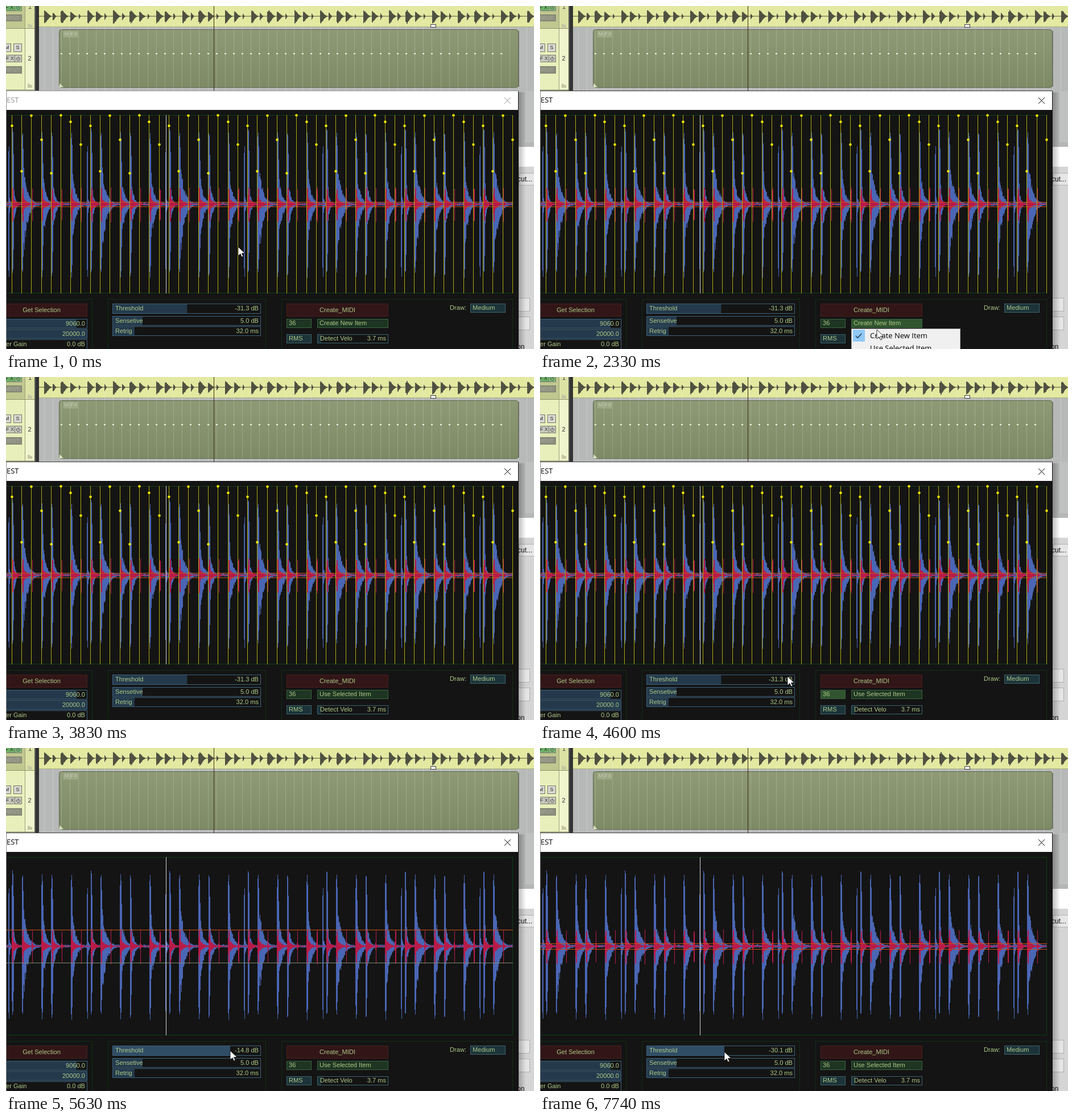
Write an HTML page with a canvas that moves like this. It is 928 px wide and 604 px high and loops after 8 s.

```html
<!DOCTYPE html>
<html>
<head>
<meta charset="utf-8">
<style>
html, body { margin: 0; width: 100%; height: 100%; overflow: hidden; background: #141414; }
canvas { display: block; }
</style>
</head>
<body>
<canvas id="stage" width="928" height="604"></canvas>
<script>
const ctx = document.getElementById('stage').getContext('2d');
const LOOP = 8000;
const UI = '11.1px "Liberation Sans", Arial, sans-serif';
const SYSTEM = '13px "Open Sans", sans-serif';
const TEXT = '#aeca88';

// Pointer positions: [start time, x, y]
const POINTER = [
  [0, 408, 424], [280, 470, 468], [530, 558, 530], [790, 608, 559], [1060, 599, 560],
  [1330, 590, 562], [2080, 592, 570], [2580, 604, 577], [2830, 612, 592], [3080, 620, 620],
  [4100, 585, 592], [4350, 500, 554], [4600, 435, 527], [4850, 394, 533],
  [6460, 420, 545], [6710, 372, 584], [6960, 326, 554], [7210, 325, 545], [7460, 324, 535]
];
const HOVER_DELAY = 250;
// Threshold in dB: [start time, value]
const THRESHOLD = [[0, -31.3], [5380, -14.8], [7740, -30.1]];

const HIT_STEP = 17.255, NOTE_STEP = 15.15, NOTES = 52, MID = 349;
const DOT_Y = [211, 291, 193, 235.5, 294.5, 192.5, 204, 244];
// Drum hits in one bar: offset, peak up, peak down, body, decay, peak width
const HITS = [
  [0, 135, 122, 24, 3, 4], [17.3, 127, 121, 62, 7, 4], [51.8, 127, 129, 42, 6, 4],
  [69, 127, 128, 32, 4.5, 4], [103.5, 126, 130, 46, 6, 4], [131.6, 102, 128, 14, 2, 2]
];
// Overview blobs, one per step: height, decay
const BLOBS = [[12, 7], [9, 7], [5, 2.5], [12, 7.5], [10, 7], [6, 2.5], [12, 7.5], [7, 4]];

const mod = (a, n) => ((a % n) + n) % n;
const noise = n => mod(Math.sin(n * 127.1) * 43758.5, 1);
const valueAt = (list, t) => list.filter((p, i) => !i || p[0] <= t).pop().slice(1);

function rect(x, y, w, h, fill, stroke) {
  if (fill) { ctx.fillStyle = fill; ctx.fillRect(x, y, w, h); }
  if (stroke) {
    ctx.strokeStyle = stroke;
    ctx.lineWidth = 1;
    ctx.strokeRect(x + .5, y + .5, w - 1, h - 1);
  }
}
function text(str, x, y, color = TEXT, font = UI, align = 'left') {
  ctx.font = font;
  ctx.fillStyle = color;
  ctx.textAlign = align;
  ctx.textBaseline = 'middle';
  ctx.fillText(str, x, y);
}
function vertical(y0, y1, top, bottom) {
  const g = ctx.createLinearGradient(0, y0, 0, y1);
  g.addColorStop(0, top);
  g.addColorStop(1, bottom);
  return g;
}

function column(path, x, mid, up, down) {
  path.rect(x, mid - up, 1, up + down);
}
function buildWaves() {
  const blue = new Path2D(), red = new Path2D(), overview = new Path2D();
  const bar = HIT_STEP * 8;
  for (let x = 1; x < 891; x++) {
    let up = 1 + 2 * noise(x), down = 1 + 2 * noise(x + 9);
    for (const [offset, top, bottom, body, decay, width] of HITS) {
      const d = mod(x - 10 - offset, bar);
      const fade = Math.exp(-Math.max(0, d - width) / decay);
      const peak = d < width ? 1 - .12 * (d - 1.3) ** 2 : 0;
      up = Math.max(up, top * peak, body * fade * (.7 + .4 * noise(x * 3)));
      down = Math.max(down, bottom * peak, 1.3 * body * fade * (.7 + .4 * noise(x * 5)));
    }
    column(blue, x, MID, up, down);

    const step = mod(Math.floor((x - 10) / HIT_STEP), 8);
    const d = mod(x - 10, HIT_STEP);
    const soft = step === 2 || step === 5 || step === 7;
    const spike = d >= 1 && d < (soft ? 2.2 : 3) ? 25 + 5 * noise(x) : 0;
    const body = (soft ? 8 : 19) * Math.exp(-d / (soft ? 3 : 6)) * (.75 + .3 * noise(x * 7));
    column(red, x, MID, Math.max(.8, spike, body), Math.max(.8, spike * 1.08, body));
  }
  for (let x = 58; x < 928; x++) {
    const d = mod(x - 97, NOTE_STEP);
    const [height, decay] = BLOBS[mod(Math.floor((x - 97) / NOTE_STEP), 8)];
    let h = height * Math.exp(-((d / decay) ** 2)) * (.85 + .2 * noise(x));
    if (mod(x - 97, NOTE_STEP * 8) > 119.5) h = 9;
    column(overview, x, 18, Math.max(.6, h * .9), Math.max(.6, h * 1.1));
  }
  return { blue, red, overview };
}
const waves = buildWaves();

function smallButton(x, y, w, h, label, fill, color) {
  rect(x, y, w, h, fill, '#77796a');
  text(label, x + w / 2, y + h / 2 + .5, color, '9px "Liberation Sans", sans-serif', 'center');
}
function powerIcon(x, y) {
  ctx.strokeStyle = '#444';
  ctx.lineWidth = 1;
  ctx.beginPath();
  ctx.arc(x, y, 3, -1, 4.1);
  ctx.moveTo(x, y - 4);
  ctx.lineTo(x, y);
  ctx.stroke();
}

function drawTrackPanel() {
  rect(0, 0, 50, 150, '#f1f5cd');
  rect(0, 0, 33, 40, '#c0c78f');
  rect(0, 40, 33, 110, '#e8efbb');
  rect(33, 0, 17, 40, '#dce2a5');
  rect(33, 0, 1, 150, '#9aa076');
  rect(0, 39, 50, 1, '#8b9069');
  rect(0, 147, 50, 2, '#a3a884');
  rect(50, 0, 8, 150, '#333');
  rect(50, 0, 2, 150, '#62645a');
  smallButton(-4, -4, 20, 13, 'F X', '#6fae6a', '#173d17');
  smallButton(15, -4, 13, 13, '', '#7ebd78');
  powerIcon(21.5, 3);
  smallButton(-8, 15, 36, 12, 'INPUT', '#8f927f', '#a8aa98');
  smallButton(-6, 66, 15, 15, 'M', '#d9d9d3', '#222');
  smallButton(13, 66, 15, 15, 'S', '#d9d9d3', '#222');
  smallButton(-2, 86, 18, 13, 'F X', '#c9cabf', '#333');
  smallButton(15, 86, 13, 13, '', '#c9cabf');
  powerIcon(21.5, 93);
  smallButton(-8, 106, 36, 13, 'INPUT', '#8d9080', '#a5a796');
  text('1', 42, 2, '#444', UI, 'center');
  text('2', 41.5, 93, '#333', UI, 'center');
  for (const y of [31, 137]) {
    rect(38, y, 4, 2, '#c5c8a3');
    rect(38, y + 2, 8, 5, '#c5c8a3');
  }
}

function drawArrange(showNotes) {
  rect(58, 0, 870, 150, '#b7b9b8');
  rect(58, 0, 870, 37, '#e3e9a0');
  rect(58, 36, 870, 1, '#aeb47a');
  for (let k = -2; k < 56; k++) {
    rect(Math.round(97 + k * NOTE_STEP), 0, 1, 150, 'rgba(235,238,225,.3)');
  }
  ctx.fillStyle = '#505141';
  ctx.fill(waves.overview);

  ctx.beginPath();
  ctx.roundRect(93.5, 41.5, 807, 102, 4);
  ctx.fillStyle = vertical(41, 143, '#8e9a75', '#7d8a65');
  ctx.fill();
  ctx.strokeStyle = '#5d674c';
  ctx.lineWidth = 1;
  ctx.stroke();
  rect(900, 44, 1.5, 98, '#3b4230');
  for (let k = 0; k < 54; k++) {
    rect(Math.round(97 + k * NOTE_STEP), 42, 1, 101, 'rgba(225,230,210,.25)');
  }
  ctx.fillStyle = '#dce3c0';
  ctx.beginPath();
  ctx.moveTo(94, 136);
  ctx.lineTo(101, 143);
  ctx.lineTo(94, 143);
  ctx.fill();
  rect(101, 44, 11, 11, '#98a381', '#a9b392');
  rect(113, 44, 13, 11, '#98a381', '#a9b392');
  text('M', 106.5, 50, '#ccd4b7', '9px "Liberation Sans", sans-serif', 'center');
  text('FX', 119.5, 50, '#ccd4b7', '9px "Liberation Sans", sans-serif', 'center');
  if (showNotes) {
    for (let k = 0; k < NOTES; k++) rect(Math.round(96 + k * NOTE_STEP), 83, 3, 2, '#f4f6ea');
  }
  rect(365, 0, 1, 150, '#3a2c18');
  rect(746, 32, 10, 6, '#f5f5f5', '#444');
}

function drawRightSide() {
  rect(901, 150, 27, 98, '#b5b7b6');
  rect(912, 150, 16, 90, '#bfc1c0');
  rect(901, 248, 27, 35, '#fff');
  rect(901, 283, 27, 321, '#d5d5d5');
  rect(901, 294, 30, 22, '#e6e6e6', '#b2b2b2');
  text('cut...', 899, 306, '#111', '12px "Liberation Sans", sans-serif');
  rect(890, 514, 31, 24, '#e5e5e5', '#b0b0b0');
  rect(890, 547, 31, 24, '#e5e5e5', '#b0b0b0');
  text('on', 898, 601, '#111', '12px "Liberation Sans", sans-serif');
  const shadow = ctx.createLinearGradient(901, 0, 914, 0);
  shadow.addColorStop(0, 'rgba(0,0,0,.25)');
  shadow.addColorStop(1, 'rgba(0,0,0,0)');
  rect(901, 152, 13, 452, shadow);
}

function drawWindow(active) {
  rect(0, 149, 901, 455, '#141414');
  rect(0, 149, 901, 1, active ? '#3c3c3c' : '#9b9b9b');
  rect(0, 150, 900, 33, '#fff');
  const ink = active ? '#000' : '#929292';
  text('EST', 1, 167, ink, SYSTEM);
  ctx.strokeStyle = ink;
  ctx.lineWidth = 1;
  ctx.beginPath();
  ctx.moveTo(876, 161); ctx.lineTo(887, 172);
  ctx.moveTo(887, 161); ctx.lineTo(876, 172);
  ctx.stroke();
}

function drawWave(db, showMarkers) {
  rect(-2, 192, 893, 314, null, '#103d14');
  ctx.fillStyle = '#4a66b4';
  ctx.fill(waves.blue);
  ctx.fillStyle = '#b81b48';
  ctx.fill(waves.red);
  const level = 157 * 10 ** (db / 20);
  rect(1, Math.round(MID - level), 890, 1, '#cc5014');
  rect(1, Math.round(MID + level), 890, 1, level > 20 ? '#7b8d70' : '#cc5014');
  if (showMarkers) {
    for (let k = 0; k < NOTES; k++) {
      const x = Math.round(9.9 + k * HIT_STEP);
      rect(x, 192, 1, 314, '#a9a90e');
      ctx.fillStyle = '#f2ee00';
      ctx.beginPath();
      ctx.arc(x + .5, DOT_Y[k % 8], 2.3, 0, 7);
      ctx.fill();
    }
  }
  rect(281, 192, 1, 314, '#d4d4d4');
}

const PALETTE = {
  red: ['#321617', '#4c2021', '#4a1c1e'],
  green: ['#1d3522', '#30552f', '#3d6340'],
  teal: ['#1c3339', '#28484f', '#3d636a'],
  blue: ['#243a4c', '#304d66', '#3e617a']
};
function drawControls(px, py, db, mode, menuOpen) {
  const over = (x, y, w, h) => !menuOpen && px >= x && px < x + w && py >= y && py < y + h;
  const button = (x, y, w, h, label, kind, centered, lit) => {
    const [idle, hot, edge] = PALETTE[kind];
    rect(x, y, w, h, lit || over(x, y, w, h) ? hot : idle, edge);
    text(label, centered ? x + w / 2 : x + 4, y + h / 2, TEXT, UI, centered ? 'center' : 'left');
  };
  const slider = (x, y, w, h, label, value, fill, kind = 'blue') => {
    const [idle, hot, edge] = PALETTE[kind];
    rect(x, y, fill, h, over(x, y, w, h) ? hot : idle);
    rect(x, y, w, h, null, edge);
    text(label, x + 5, y + h / 2);
    text(value, x + w - 4, y + h / 2, TEXT, UI, 'right');
  };
  for (const [x, w] of [[-10, 162], [179, 278], [484, 407]]) rect(x, 516, w, 100, null, '#103015');

  button(-18, 524, 161, 23, 'Get Selection', 'red', true);
  slider(-60, 551, 203, 17, '', '9060.0', 184);
  slider(-60, 569, 203, 17, '', '20000.0', 203);
  slider(-60, 587, 203, 18, '', '0.0 dB', 30);
  text('er Gain', 0, 596);

  slider(187, 524, 261, 18, 'Threshold', db.toFixed(1) + ' dB', 261 * (db + 60) / 57);
  slider(187, 546, 261, 17, 'Sensetive', '5.0 dB', 53);
  slider(187, 564, 261, 17, 'Retrig', '32.0 ms', 39);

  button(493, 524, 179, 23, 'Create_MIDI', 'red', true);
  button(493, 551, 44, 16, '36', 'green');
  button(547, 551, 125, 16, mode, 'green', false, menuOpen);
  button(493, 578, 44, 16, 'RMS', 'teal');
  slider(547, 578, 125, 16, 'Detect Velo', '3.7 ms', 7, 'teal');
  text('Draw:', 780, 532);
  button(816, 524, 62, 16, 'Medium', 'teal');
}

function drawMenu(hovered) {
  rect(547, 568, 192, 60, '#f0f0f0', '#a8a8a8');
  ['Create New Item', 'Use Selected Item'].forEach((label, i) => {
    const y = 570 + i * 21.5;
    if (i === hovered) rect(550, y, 187, 21.5, '#91c9f7');
    if (i === 0) {
      rect(550, y, 21, 21, hovered === 0 ? '#56b0fa' : '#91c9f7');
      ctx.strokeStyle = '#152b45';
      ctx.lineWidth = 1.3;
      ctx.beginPath();
      ctx.moveTo(555, 581); ctx.lineTo(558.5, 584.5); ctx.lineTo(565, 577);
      ctx.stroke();
    }
    text(label, 580, y + 12, '#000', SYSTEM);
  });
}

function drawPointer(x, y) {
  const shape = [[0, 0], [0, 16], [4, 12.5], [6.5, 18], [9, 17], [6.5, 11.5], [12, 11.5]];
  ctx.beginPath();
  shape.forEach(([dx, dy]) => ctx.lineTo(x + dx, y + dy));
  ctx.closePath();
  ctx.fillStyle = '#fff';
  ctx.fill();
  ctx.strokeStyle = '#000';
  ctx.lineWidth = .8;
  ctx.stroke();
}

function draw(t) {
  const [px, py] = valueAt(POINTER, t);
  const [hoverX, hoverY] = valueAt(POINTER, t - HOVER_DELAY);
  const [db] = valueAt(THRESHOLD, t);
  const detected = t < 5380;
  const menuOpen = t >= 1830 && t < 3830;
  const mode = t < 3830 ? 'Create New Item' : 'Use Selected Item';
  drawArrange(detected);
  drawTrackPanel();
  drawRightSide();
  drawWindow(t >= 1330);
  drawWave(db, detected);
  drawControls(hoverX, hoverY, db, mode, menuOpen);
  if (menuOpen) drawMenu(t < 2580 ? -1 : t < 2830 ? 0 : 1);
  rect(0, 150, 1, 454, '#8a8a8a');
  drawPointer(px, py);
}

function tick() {
  draw(performance.now() % LOOP);
  requestAnimationFrame(tick);
}
tick();
</script>
</body>
</html>
```
